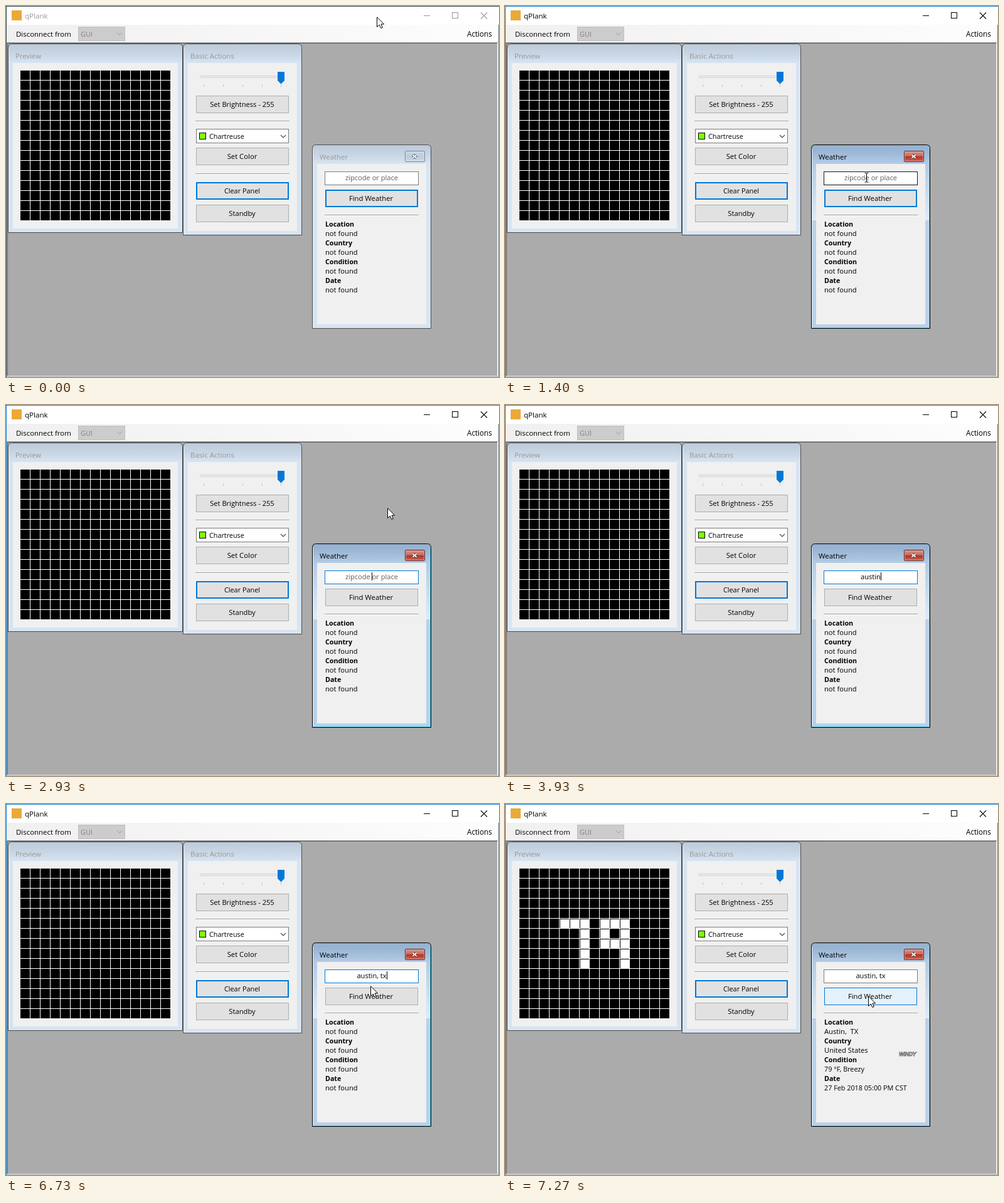
Recreate the animation shown at these times as an HTML page. Size 786x592 px, loop 8000 ms.

```html
<!DOCTYPE html>
<html lang="en">
<head>
<meta charset="utf-8">
<title>qPlank</title>
<style>
  html, body { margin: 0; width: 100%; height: 100%; overflow: hidden; background: #ababab; }
  svg { display: block; width: 786px; height: 592px; }
  text { font-family: "Open Sans", "Noto Sans", sans-serif; white-space: pre; }
  rect { shape-rendering: crispEdges; }
</style>
</head>
<body>
<svg id="stage" viewBox="0 0 786 592" xmlns="http://www.w3.org/2000/svg"></svg>
<script>
const LOOP = 8000;
const BLUE = '#0078d7';

// ---- markup helpers ----
const fill = (x, y, w, h, color, extra = '') =>
  `<rect x="${x}" y="${y}" width="${w}" height="${h}" fill="${color}" ${extra}/>`;

const box = (x, y, w, h, color, line, lw = 1, extra = '') =>
  `<rect x="${x + lw / 2}" y="${y + lw / 2}" width="${w - lw}" height="${h - lw}"
    fill="${color}" stroke="${line}" stroke-width="${lw}" ${extra}/>`;

const label = (str, x, y, size = 11.3, color = '#000', extra = '') =>
  `<text x="${x}" y="${y}" font-size="${size}" fill="${color}" ${extra}>${str}</text>`;

const centred = (str, x, y, size, color, extra = '') =>
  label(str, x, y, size, color, `text-anchor="middle" ${extra}`);

const stroke = (d, color, width = 1, extra = '') =>
  `<path d="${d}" fill="none" stroke="${color}" stroke-width="${width}" ${extra}/>`;

const vertical = (id, stops) =>
  `<linearGradient id="${id}" x1="0" y1="0" x2="0" y2="1">` +
  stops.map(([at, c]) => `<stop offset="${at}" stop-color="${c}"/>`).join('') + '</linearGradient>';

const button = (str, y, size = 11.1, main = false) =>
  box(303, y, 148, 28, '#e1e1e1', main ? BLUE : '#adadad', main ? 2 : 1) +
  centred(str, 376.5, y + 18, size);

const divider = (x, y) => fill(x, y, 150, 1, '#a0a0a0') + fill(x, y + 1, 150, 1, '#fff');

// Child window: rounded top, tinted frame, grey client area
function frame(x, y, w, h, top, active) {
  const d = `M${x + .5} ${y + h - .5}V${y + 6.5}q0-6 6-6H${x + w - 6.5}q6 0 6 6V${y + h - .5}z`;
  const ch = h - top - 7;
  let out = `<path d="${d}" fill="${active ? '#b9d1ea' : '#d7e4f2'}"/>`;
  out += `<path d="M${x + 1} ${y + top}V${y + 6.5}q0-5.500 6-5.500H${x + w - 7}q6 0 6 5.500V${y + top}z"
    fill="url(#${active ? 'titleOn' : 'titleOff'})"/>`;
  if (active) {
    out += fill(x + 1, y + top, w - 2, 90, 'url(#sideOn)');
    out += stroke(`M${x + 1.5} ${y + h - 2}V${y + 7}`, '#e4f0fb');
    out += stroke(`M${x + w - 1.5} ${y + 8}V${y + h - 1.5}H${x + 2}`, '#45cfea');
  } else {
    out += stroke(`M${x + 1.5} ${y + h - 2}V${y + 7}`, '#e9f1f9');
  }
  out += stroke(d, active ? '#000' : '#4b4b4b');
  return out + fill(x + 8, y + top, w - 16, ch, '#f0f0f0');
}

function closeBox(active) {
  const cross = 'M648.500 237.500l6 5M654.500 237.500l-6 5';
  return `<rect x="636.500" y="231.500" width="31" height="17" rx="2"
      fill="url(#${active ? 'closeOn' : 'closeOff'})" stroke="${active ? '#5b2a2a' : '#74849a'}"/>` +
    stroke('M637.500 232.500h29v15h-29z', active ? '#e6aaa0' : '#dbe5ef', 1, 'opacity=".7"') +
    stroke(cross, active ? '#5a3030' : '#4b5664', 4) + stroke(cross, '#fff', 2);
}

function chrome(active) {
  const ink = active ? '#000' : '#999';
  const edge = active ? '#1883d7' : '#3a4656';
  return label('qPlank', 30, 20, 11.6, ink) +
    fill(666, 15, 10, 1, ink) + box(711, 10, 10, 10, 'none', ink) +
    stroke('M757 10.500l10 10M767 10.500l-10 10', ink, 1.1) +
    fill(0, 0, 786, 1, edge) + fill(0, 0, 1, 592, edge) +
    frame(488, 221, 190, 294, 31, active) +
    label('Weather', 500, 245, 11.4, active ? '#000' : '#989898') + closeBox(active);
}

function grid() {
  let out = fill(23, 103, 239, 239, '#fff');
  for (let i = 0; i < 225; i++)
    out += fill(23 + i % 15 * 16, 103 + Math.floor(i / 15) * 16, 15, 15, '#000');
  return out;
}

function digits() {
  const rows = ['### ###', '  # # #', '  # ###', '  #   #', '  #   #'];
  return rows.map((row, r) => [...row].map((c, i) =>
    c === '#' ? fill(88 + i * 16, 184 + r * 16, 14, 14, '#fff') : '').join('')).join('');
}

const values = list => list.map((v, i) => label(v, 509, 367 + i * 30, i > 1 && list[0] !== v ? 10.8 : 11.2)).join('');

const headings = ['Location', 'Country', 'Condition', 'Date'].map((h, i) =>
  label(h, 509, 352 + i * 30, 10.7, '#000', 'font-weight="700"')).join('');

// ---- scene ----
document.getElementById('stage').innerHTML = `
<defs>
  <linearGradient id="bar"><stop offset="0" stop-color="#f0f0f0"/><stop offset="1" stop-color="#fdfdfd"/></linearGradient>
  ${vertical('titleOff', [[0, '#bccbda'], [.5, '#c7d5e4'], [1, '#d7e4f2']])}
  ${vertical('titleOn', [[0, '#94b0ce'], [.4, '#9db8d6'], [1, '#b3cce6']])}
  ${vertical('sideOn', [[0, '#b3cce6'], [1, '#dfecf9']])}
  ${vertical('closeOff', [[0, '#cbd7e4'], [.5, '#bdcbdb'], [1, '#cbd8e6']])}
  ${vertical('closeOn', [[0, '#dd9a8e'], [.48, '#c7655a'], [.5, '#ab3026'], [1, '#cf6a58']])}
</defs>
${fill(0, 0, 786, 592, '#ababab')}
${fill(0, 0, 786, 30, '#fff')}
${fill(0, 30, 786, 28, 'url(#bar)')}
${fill(9, 7, 16, 16, '#eba937')}
${label('Disconnect from', 16, 49, 11.45)}
${label('Actions', 735, 49, 11.7)}
${box(115, 33, 75, 23, '#ccc', '#bfbfbf')}
${label('GUI', 119, 49, 11, '#838383')}
${stroke('M177 42.500l4 4 4-4', '#9a9a9a')}
${fill(1, 58, 784, 1, '#8c8c8c') + fill(1, 59, 783, 1, '#696969')}
${fill(1, 58, 1, 533, '#a0a0a0') + fill(2, 59, 1, 532, '#696969')}
${fill(783, 59, 1, 532, '#e3e3e3') + fill(784, 58, 1, 534, '#fff')}
${fill(785, 30, 1, 562, '#6b7480') + fill(1, 590, 784, 1, '#e3e3e3')}

${frame(3, 60, 279, 302, 31, false)}
${label('Preview', 15, 84, 11.4, '#989898')}
${grid()}

${frame(282, 60, 190, 306, 31, false)}
${label('Basic Actions', 294, 84, 11.5, '#989898')}
${box(309, 111, 135, 4, '#e7eaea', '#d6d6d6')}
${[315, 346, 377, 408, 438].map(x => fill(x, 125, 1, 4, '#c4c4c4')).join('')}
<path d="M433 105h11v14l-5.500 5.500L433 119z" fill="${BLUE}"/>
${button('Set Brightness - 255', 143)}
${divider(302, 183)}
${box(303, 196, 148, 23, '#fff', '#7a7a7a')}
${box(308, 202, 11, 11, '#7fff00', '#000')}
${label('Chartreuse', 324, 212, 10.8)}
${stroke('M438 206l4 4 4-4', '#444', 1.1)}
${button('Set Color', 226, 11.3)}
${divider(302, 267)}
${button('Clear Panel', 281, 10.9, true)}
${button('Standby', 317, 11.2)}

<g id="idle">${chrome(false)}</g>
<g id="active">${chrome(true)}</g>
${box(508, 264, 150, 22, '#fff', '#7a7a7a', 1, 'id="field"')}
${centred('', 583, 278, 11.1, '#000', 'id="entry"')}
${fill(583, 267, 1, 13, '#000', 'id="caret"')}
${box(509, 293, 148, 28, '#e1e1e1', '#adadad')}
${box(509, 293, 148, 28, '#e1e1e1', BLUE, 2, 'id="main"')}
${box(509, 293, 148, 28, '#e5f1fb', BLUE, 1, 'id="hover"')}
${box(509, 293, 148, 28, '#cce4f7', '#005499', 1, 'id="press"')}
${centred('Find Weather', 582, 311, 11.3)}
${divider(508, 333)}
${headings}
<g id="empty">${values(Array(4).fill('not found'))}</g>
<g id="found">
  ${values(['Austin,  TX', 'United States', '79 °F, Breezy', '27 Feb 2018 05:00 PM CST'])}
  <text x="628" y="402" font-size="9" fill="#fff" stroke="#666" stroke-width=".8"
    style="font-family:'Liberation Sans',sans-serif;font-weight:700;font-style:italic;letter-spacing:-.6px">WINDY</text>
  ${digits()}
</g>
<path id="beam" d="M-3 -7h2.500l.5 .5 .5-.5H3M0-6.500V7M-3 7.500h2.500l.5-.5 .5 .5H3" fill="none" stroke="#000"/>
<path id="arrow" d="M.5 .8V16.500L4.300 13 6.800 18.400 9.300 17.400 7 12H11.600z" fill="#fff" stroke="#000"/>`;

const el = Object.fromEntries([...document.querySelectorAll('#stage [id]')].map(n => [n.id, n]));

// ---- motion ----
const route = [
  [70, 591, 17], [800, 577, 262], [930, 575, 263], [1000, 576, 273], [1800, 576, 273],
  [2130, 608, 164], [6400, 608, 164], [6730, 581, 290], [6930, 579, 306], [LOOP, 579, 306]
];
const keys = [3070, 3270, 3400, 3670, 3800, 3930, 4330, 4530, 4730, 5400];
const blinks = [1870, 2400, 2930, 5200, 5400, 5930, 6470, 7000];

const passed = (times, t) => times.filter(at => t >= at).length;
const ramp = (t, a, b) => Math.min(1, Math.max(0, (t - a) / (b - a)));
const show = (node, on) => node.setAttribute('visibility', on ? 'visible' : 'hidden');

function pointer(t) {
  const i = route.findIndex(p => t < p[0]);
  if (i === 0) return route[0].slice(1);
  const [t0, x0, y0] = route[i - 1], [t1, x1, y1] = route[i];
  const k = ramp(t, t0, t1), e = k * k * (3 - 2 * k);
  return [x0 + (x1 - x0) * e, y0 + (y1 - y0) * e].map(Math.round);
}

function draw(ms) {
  const t = Math.floor((ms + 4) * 0.015) / 0.015 + 5;
  const done = t >= 7270;

  show(el.idle, t < 1400);
  show(el.active, t >= 1400);
  show(el.empty, !done);
  show(el.found, done);

  const focus = t >= 1470 && t < 7070;
  const over = t >= 1000 && t < 1470;
  el.field.setAttribute('stroke', focus ? BLUE : over ? '#171717' : '#7a7a7a');

  const typed = 'austin, tx'.slice(0, passed(keys, t));
  el.entry.textContent = typed || 'zipcode or place';
  el.entry.setAttribute('fill', typed ? '#000' : '#5f5f5f');
  const half = typed ? el.entry.getComputedTextLength() / 2 : 0;
  el.caret.setAttribute('x', Math.round(583 + half));
  show(el.caret, passed(blinks, t) % 2);

  el.main.setAttribute('opacity', 1 - ramp(t, 1400, 1670));
  el.hover.setAttribute('opacity', ramp(t, 6740, 6930));
  show(el.press, t >= 7000 && t < 7130);

  const [x, y] = pointer(t);
  const beam = t >= 1000 && t < 1870;
  const hidden = t >= 3070 && t < 6470;
  el.beam.setAttribute('transform', `translate(${x + .5} ${y + .5})`);
  el.arrow.setAttribute('transform', `translate(${x} ${y})`);
  show(el.beam, beam);
  show(el.arrow, !beam && !hidden);
}

const start = performance.now();
function tick() {
  draw((performance.now() - start) % LOOP);
  requestAnimationFrame(tick);
}
tick();
</script>
</body>
</html>
```
